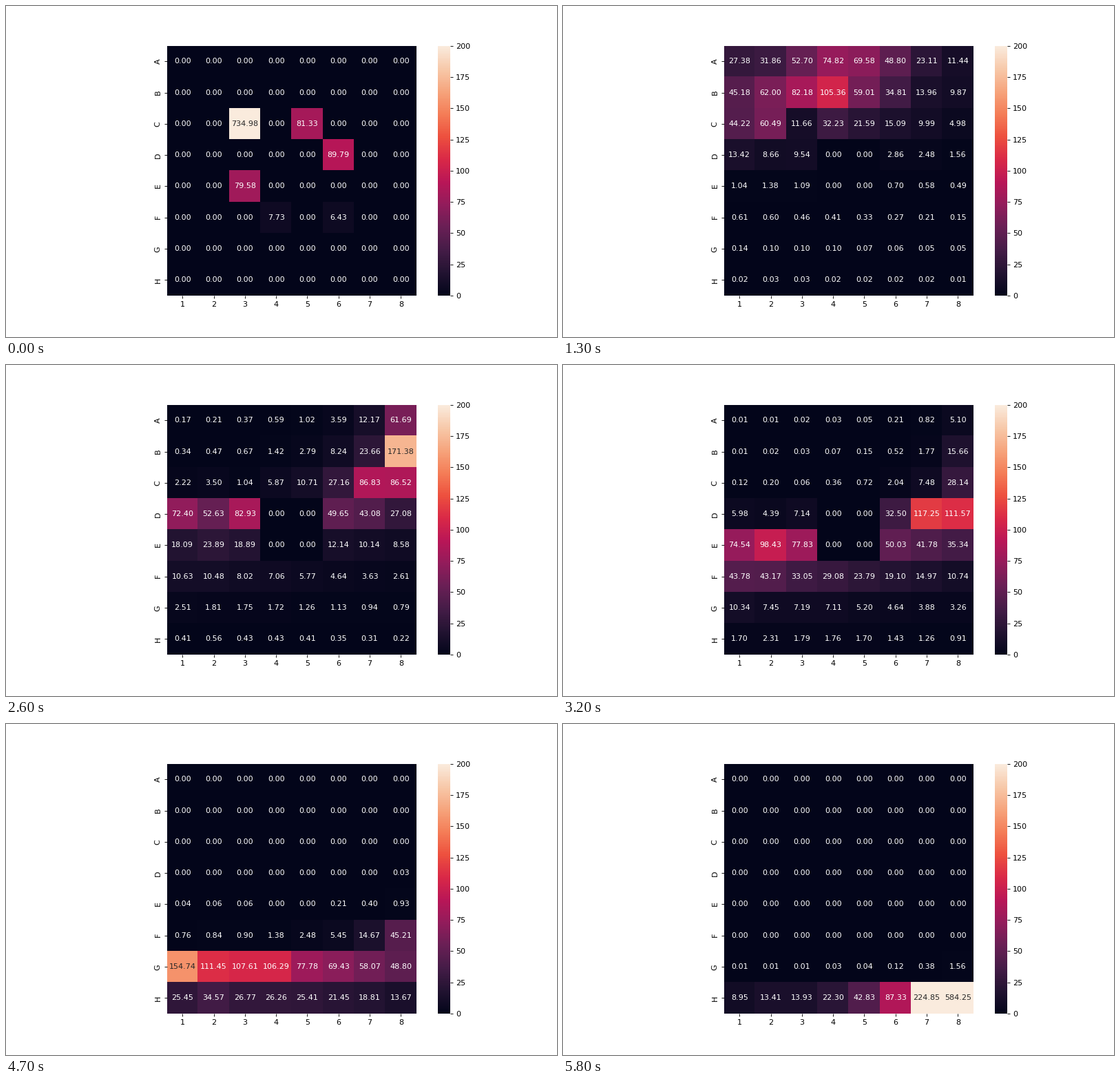
Animation of 800 by 480 pixels, one loop 5.9 s. Source, as a matplotlib script:

```python
import numpy as np
import matplotlib.pyplot as plt
from matplotlib.animation import FuncAnimation
from matplotlib.colors import LinearSegmentedColormap

FRAMES, STEP = 59, 100
SIZE, TOTAL, VMAX = 8, 1000, 200
ROWS = "ABCDEFGH"

rocket = LinearSegmentedColormap.from_list("heat", [
    "#03051a", "#221331", "#451c47", "#691f55", "#921c5b", "#b91657",
    "#d92847", "#ed503e", "#f47d57", "#f6a47c", "#f7c9aa", "#faebdd"])

# Opening moves and how often each is played.
opening = np.zeros((SIZE, SIZE))
for cell, count in {"C3": 734.98, "C5": 81.33, "D6": 89.79,
                    "E3": 79.58, "F4": 7.73, "F6": 6.43}.items():
    opening[ROWS.index(cell[0]), int(cell[1]) - 1] = count

# Step at which each row is busiest, in its first and last column.
first = np.array([9, 11, 16, 24, 35, 39, 47, 54])
last = np.array([24, 26, 28, 34, 39.5, 45.5, 52, 58])
across = np.linspace(0, 1, SIZE) ** 2
peak = first[:, None] + np.outer(last - first, across)

# Rings around the four centre cells, which are never played.
off = np.abs(np.arange(SIZE) - (SIZE - 1) / 2)
ring = np.maximum.outer(off, off) - .5

rng = np.random.default_rng(4)
weight = (1 - opening / TOTAL) * (ring > 0)
weight *= np.exp(rng.normal(0, .12, weight.shape))


def state(i):
    """Counts at step i: slow rise to each peak, faster fall, fixed total."""
    dt = i - peak
    fall = 1 + .05 * (FRAMES - 1 - i)
    rest = weight * np.exp(np.where(dt < 0, dt / 5, -dt / fall))
    rest /= 1 + np.exp(2.5 * (ring - 1) - i)
    start = opening * np.exp(-i)
    return start + rest * (1 - np.exp(-i)) * TOTAL / rest.sum()


def ink(value):
    """Dark text on bright cells, white elsewhere."""
    rgb = np.array(rocket(value / VMAX)[:3])
    lin = np.where(rgb <= .03928, rgb / 12.92, ((rgb + .055) / 1.055) ** 2.4)
    return ".15" if lin @ [.2126, .7152, .0722] > .408 else "w"


plt.rcParams.update({"font.family": "DejaVu Sans", "font.size": 10})
fig, ax = plt.subplots(figsize=(10, 6), dpi=80, facecolor="w")
fig.subplots_adjust(left=.125, right=.9, bottom=.125, top=.88)

# Half a pixel back, so that cell borders round down.
edges = np.arange(SIZE + 1) - .01
mesh = ax.pcolormesh(edges, edges, state(0), cmap=rocket, vmin=0, vmax=VMAX)
ax.set(xlim=(0, SIZE), ylim=(SIZE, 0), aspect="equal")
centers = np.arange(SIZE) + .5
ax.set_xticks(centers, [str(n + 1) for n in range(SIZE)])
ax.set_yticks(centers, list(ROWS), rotation="vertical")
ax.spines[:].set_visible(False)

bar = fig.colorbar(mesh, ax=ax, ticks=range(0, VMAX + 1, 25))
bar.outline.set_linewidth(0)

labels = [ax.text(x - .001, y, "", ha="center", va="center")
          for y in centers for x in centers]


def update(i):
    grid = state(i)
    mesh.set_array(grid)
    for label, value in zip(labels, grid.flat):
        label.set_text(f"{value:.2f}")
        label.set_color(ink(value))
    return [mesh, *labels]


anim = FuncAnimation(fig, update, frames=FRAMES, interval=STEP,
                     repeat=True, repeat_delay=0)
plt.show()
```
